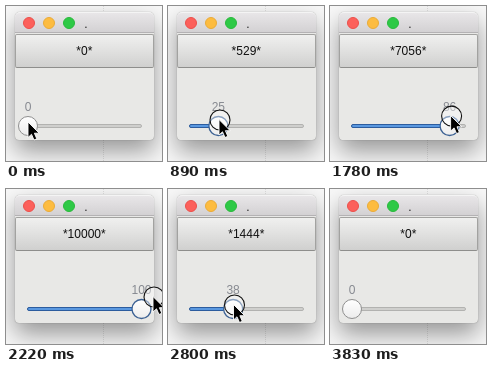
These frames come from a looping animation (156 by 155 pixels, 4.43 s). An HTML page:

```html
<!DOCTYPE html>
<html lang="en">
<head>
<meta charset="utf-8">
<title>Slider</title>
<style>
  html, body { margin: 0; width: 100%; height: 100%; overflow: hidden; background: #f8f8f8; }
  .stage { position: relative; width: 156px; height: 155px; overflow: hidden; background: #f8f8f8; }
  .window {
    position: absolute; left: 9px; top: 6px; width: 139px; height: 128px;
    border-radius: 5px 5px 4px 4px; background: #e8e8e6;
    box-shadow: 0 0 1px rgba(0,0,0,.45), 0 11px 25px rgba(0,0,0,.4);
  }
  .bar {
    position: absolute; left: 0; top: 0; width: 139px; height: 21px; box-sizing: border-box;
    border-radius: 5px 5px 0 0; border-top: 1px solid #f4f4f4; border-bottom: 1px solid #b4b2b4;
    background: linear-gradient(#e8e6e8, #d3d1d3);
  }
  .button {
    position: absolute; left: 0; top: 22px; width: 139px; height: 34px; box-sizing: border-box;
    border: 1px solid #a2a2a0; border-bottom-color: #8e8e8c; border-radius: 2px;
    background: linear-gradient(#f0f0ef, #e2e2e1 45%, #d0d0cf);
  }
  svg { position: absolute; left: 0; top: 0; display: block; }
  text { font: 12px "Liberation Sans", Arial, sans-serif; text-anchor: middle; }
</style>
</head>
<body>
<div class="stage">
  <svg width="156" height="155">
    <path d="M97.5 0V155" stroke="#000" stroke-opacity=".1" stroke-dasharray="1 1"/>
  </svg>
  <div class="window"><div class="bar"></div><div class="button"></div></div>
  <svg width="156" height="155" viewBox="0 0 156 155">
    <defs>
      <linearGradient id="face" x2="0" y2="1">
        <stop stop-color="#fff"/><stop offset="1" stop-color="#ececec"/>
      </linearGradient>
    </defs>
    <circle cx="23" cy="17" r="5.5" fill="#fc605b" stroke="#ec4f4b"/>
    <circle cx="43" cy="17" r="5.5" fill="#fdbc40" stroke="#eaab38"/>
    <circle cx="63" cy="17" r="5.5" fill="#2ec946" stroke="#29b93c"/>
    <text x="80" y="22" fill="#222" font-weight="bold">.</text>
    <text id="square" x="78.3" y="49" fill="#111"></text>
    <text id="label" y="104.5" fill="#878a91"></text>
    <rect x="21.5" y="118.5" width="114" height="3" rx="1.5" fill="#cfcfcd" stroke="#b2b2b0"/>
    <rect id="fill" x="21.5" y="118.5" height="3" rx="1.5" fill="#5a98e0" stroke="#2c5c9e"/>
    <circle id="knob" cy="120" r="9.5" fill="url(#face)"/>
    <g id="pointer">
      <circle id="ring" cx="1" cy=".5" r="10" fill="#fff" fill-opacity=".4" stroke="#111" stroke-width="1.1"/>
      <path d="M0 0V15.5L3.5 12.3L6 18L8.8 16.8L6.4 11.2H11.2Z" fill="#000" stroke="#fff" stroke-width=".9"/>
    </g>
  </svg>
</div>
<script>
  const LOOP = 4430, START = 290, STEP = 147.3;
  const LEFT = 22, SPAN = 113.5;
  const RELEASE = 21, TURN = 11, GONE = 24;
  // Pointer path: [step, x, y]
  const path = [
    [0, 22, 116], [4, 51, 113.5], [7, 86, 112], [8, 103, 111], [13, 147, 107.5],
    [17, 65.5, 115.5], [19, 0, 119], [20, -3, 121], [23, 113.5, 153]
  ];
  const $ = id => document.getElementById(id);
  const set = (id, attrs) => {
    for (const k in attrs) $(id).setAttribute(k, attrs[k]);
  };
  const clamp = (v, lo, hi) => Math.max(lo, Math.min(hi, v));

  function pointerAt(n) {
    const i = clamp(path.findIndex(p => p[0] >= n), 1, path.length - 1);
    const [a, b] = [path[i - 1], path[i]];
    const k = clamp((n - a[0]) / (b[0] - a[0]), 0, 1);
    return [1, 2].map(j => a[j] + (b[j] - a[j]) * k);
  }

  function draw(n) {
    const [x, y] = pointerAt(n);
    const pressed = n >= 0 && n < RELEASE;
    const value = pressed ? clamp(Math.floor((x - LEFT) / SPAN * 100), 0, 100) : 0;
    const knobX = LEFT + value / 100 * SPAN;
    // The button text trails the slider on the way up
    const trailing = n < TURN ? Math.max(0, value - 2) : value;
    $("square").textContent = `*${trailing ** 2}*`;
    $("label").textContent = value;
    set("label", { x: knobX });
    set("fill", { width: knobX - 21.5, visibility: value ? "visible" : "hidden" });
    set("knob", {
      cx: knobX,
      stroke: pressed ? "#3d6294" : "#8f8f8f",
      "stroke-width": pressed ? 1.3 : 1
    });
    set("ring", { "stroke-opacity": +pressed, "fill-opacity": pressed ? 0.4 : 0 });
    set("pointer", {
      transform: `translate(${x} ${y})`,
      visibility: n < GONE ? "visible" : "hidden"
    });
  }

  const start = performance.now();
  let shown = null;
  function tick() {
    const t = (performance.now() - start) % LOOP;
    const n = clamp(Math.floor((t - START) / STEP), -1, GONE);
    if (n !== shown) draw(shown = n);
    requestAnimationFrame(tick);
  }
  tick();
</script>
</body>
</html>
```
